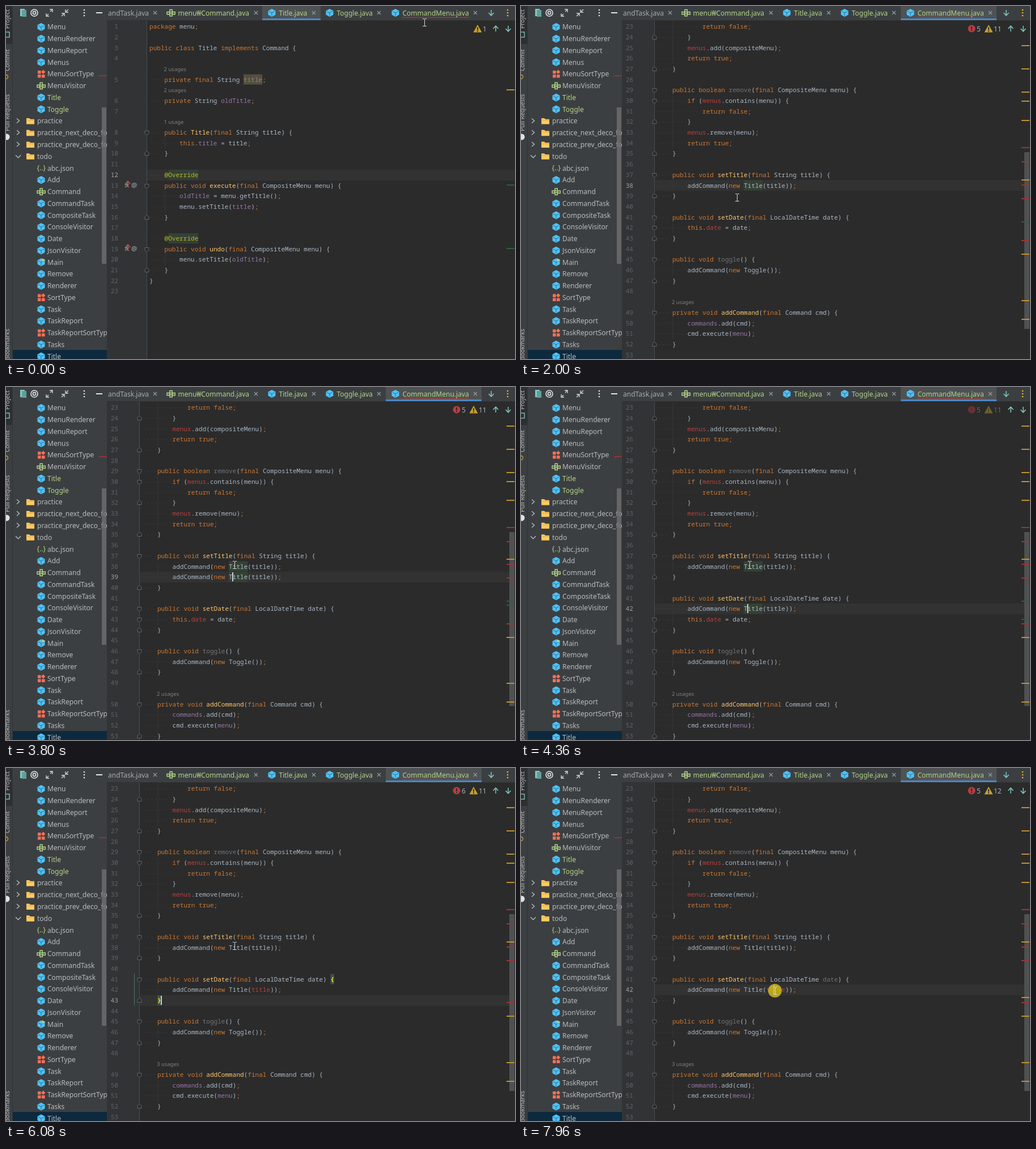
Write an HTML page with a canvas that moves like this. It is 898 by 623 pixels and loops after 8 s.

```html
<!DOCTYPE html>
<html lang="en">
<head>
<meta charset="utf-8">
<title>Code editor</title>
<style>
html, body { margin: 0; width: 100%; height: 100%; overflow: hidden; background: #2b2b2b; }
canvas { display: block; }
</style>
</head>
<body>
<canvas id="stage" width="898" height="623"></canvas>
<script>
const ctx = document.getElementById('stage').getContext('2d');
const LOOP = 8000, CH = 6.64, ROW = 18.69, TOP = 36.2;
const MONO = '11.07px "Noto Sans Mono", "DejaVu Sans Mono", monospace';
const sans = size => `${size}px "Noto Sans", "Open Sans", sans-serif`;
const KEYWORD = /^(package|public|private|final|class|implements|void|boolean|return|true|false|new|this|if)$|^[;,]$/;
const GREEN = '#b3d588', CYAN = '#4fc3f7', TEAL = '#80cbc4', PANEL = '#3c3f41';
const STYLE = { k: '#cc7832', t: '#a9b7c6', m: '#ffc66d', f: '#9876aa', r: '#bc3f3c', g: '#72737a',
  a: '#bbb529', h: '#a9b7c6', o: '#bbb529', w: '#94799f', b: '#ffef28' };
const BACK = { h: '#344134', o: '#344134', w: '#52503a', b: '#3b514d' };

const titleDoc = `package menu;

public class Title implements Command {

#2 usages
    private final String [w:title];
#2 usages
    private String [f:oldTitle];

#1 usage
    public [m:Title](final String title) {
        this.[f:title] = title;
    }

    [a:@][o:Override]
    public void [m:execute](final CompositeMenu menu) {
        [f:oldTitle] = menu.getTitle();
        menu.setTitle([f:title]);
    }

    [a:@][o:Override]
    public void [m:undo](final CompositeMenu menu) {
        menu.setTitle([f:oldTitle]);
    }
}
`.split('\n');

const menuDoc = `            return false;
        }
        [r:menus].add(compositeMenu);
        return true;
    }

    public boolean [g:remove](final CompositeMenu menu) {
        if ([r:menus].contains(menu)) {
            return false;
        }
        [r:menus].remove(menu);
        return true;
    }

    public void [m:setTitle](final String title) {
        addCommand(new [h:Title](title));
    }

    public void [m:setDate](final LocalDateTime date) {
        this.[r:date] = date;
    }

    public void [g:toggle]() {
        addCommand(new Toggle());
    }

#2 usages
    private void [m:addCommand](final Command cmd) {
        [f:commands].add(cmd);
        cmd.execute([f:menu]);
    }
`.split('\n');

// time, line, column, shown
const carets = [[320, 38, 27, 1], [800, 38, 27, 0], [1320, 38, 27, 1], [1840, 38, 27, 0],
  [2160, 39, 5, 1], [2640, 39, 5, 0], [2880, 38, 24, 1], [3400, 38, 24, 0],
  [3800, 39, 24, 1], [4080, 40, 20, 1], [4200, 41, 20, 1], [4360, 42, 24, 1],
  [4760, 43, 24, 1], [5440, 43, 24, 0], [6080, 43, 5, 1], [6600, 43, 5, 0],
  [7120, 43, 5, 1], [7280, 42, 31, 1]];
// time, x, y
const path = [[0, 738, 29], [80, 738, 29], [240, 738, 18], [480, 738, 18], [880, 650, 120],
  [1720, 306, 352], [1880, 306, 352], [2000, 381, 338], [2160, 381, 338], [2640, 388, 402],
  [2720, 388, 402], [2880, 403, 314], [6600, 403, 314], [7280, 448, 393], [8000, 448, 393]];
const clicks = [[240, 480], [2160, 2320], [2840, 3000], [7280, 7440], [7840, 8000]];

const tree = `c Menu,c MenuRenderer,c MenuReport,c Menus,e MenuSortType,i MenuVisitor,c Title,c Toggle,
d practice,d practice_next_deco_fo,d practice_prev_deco_fo,o todo,j abc.json,c Add,i Command,c CommandTask,
c CompositeTask,c ConsoleVisitor,c Date,c JsonVisitor,m Main,c Remove,c Renderer,e SortType,c Task,
c TaskReport,e TaskReportSortType,c Tasks,c Title`.replace(/\n/g, '').split(',');

function rect(x, y, w, h, color) { ctx.fillStyle = color; ctx.fillRect(x, y, w, h); }
function text(s, x, y, color, font) { ctx.font = font; ctx.fillStyle = color; ctx.fillText(s, x, y); }
function disc(x, y, r, color) {
  ctx.fillStyle = color; ctx.beginPath(); ctx.arc(x, y, r, 0, 7); ctx.fill();
}
function trace(points, close) {
  ctx.beginPath();
  points.forEach(([x, y]) => ctx.lineTo(x, y));
  if (close) ctx.closePath();
}
function line(points, color, width = 1) {
  trace(points); ctx.strokeStyle = color; ctx.lineWidth = width; ctx.stroke();
}
function poly(points, color) { trace(points, true); ctx.fillStyle = color; ctx.fill(); }
function at(x, y, draw) { ctx.save(); ctx.translate(x, y); draw(); ctx.restore(); }

const icons = {
  c() {
    poly([[0, -7], [6.5, -3.5], [6.5, 3.5], [0, 7], [-6.5, 3.5], [-6.5, -3.5]], CYAN);
    line([[-5, -2.5], [0, 0.2], [5, -2.5]], '#32698a');
    line([[0, 0], [0, 5.5]], '#32698a');
  },
  m() { icons.c(); poly([[2, -7], [7.5, -4], [2, -1]], GREEN); },
  e() {
    [[-6, -6], [-6, 1], [1, 1]].forEach(([x, y]) => rect(x, y, 5.5, 5.5, '#ff7058'));
    poly([[3.7, -7.5], [7.3, -3.6], [3.7, 0], [0, -3.6]], '#ff7058');
  },
  i() {
    ctx.strokeStyle = GREEN; ctx.lineWidth = 1.5;
    [[-7, -1.5], [-2, -5.5], [-2, 1.5], [3, -1.5]].forEach(([x, y]) => ctx.strokeRect(x, y, 4.2, 4.2));
  },
  j() { text('{..}', -7.5, 4, GREEN, sans(12)); },
  d() {
    poly([[-7, -5], [-2, -5], [0, -3.3], [7, -3.3], [7, 5.5], [-7, 5.5]], '#ffca62');
    line([[-5, -1.5], [7, -1.5]], '#d8a545');
  },
  o() { icons.d(); }
};

function arrow(x, y, up, color) {
  const s = up ? -1 : 1;
  line([[x, y - 5 * s], [x, y + 4.5 * s]], color, 1.5);
  line([[x - 4.5, y], [x, y + 4.8 * s], [x + 4.5, y]], color, 1.5);
}
function dots(x, color) { [7, 12, 17].forEach(y => disc(x, y, 1.3, color)); }

function sidebar() {
  rect(0, 0, 178, 623, PANEL);
  ctx.save();
  ctx.beginPath(); ctx.rect(12, 25, 166, 598); ctx.clip();
  rect(12, 607, 166, 16, '#0d293e');
  tree.forEach((entry, i) => {
    const type = entry[0], name = entry.slice(2), y = 37 + i * 20.76;
    const folder = type === 'd' || type === 'o';
    at(folder ? 43 : 62, y, icons[type]);
    if (type === 'd') line([[19, y - 4.5], [23.5, y - 0.5], [19, y + 3.5]], '#b5b9bc', 1.4);
    if (type === 'o') line([[17, y - 2], [21.5, y + 2.5], [26, y - 2]], '#b5b9bc', 1.4);
    text(name, folder ? 55 : 73, y + 4.4, i === 6 || i === 7 ? GREEN : '#b9bdbf', sans(12));
  });
  rect(164, 122, 14, 2, '#8f3535');
  rect(169, 179, 8, 276, 'rgba(112,114,116,.75)');
  ctx.restore();

  rect(25, 5, 8, 13, TEAL);
  rect(28, 7, 8, 12, '#5f9f9c');
  ctx.strokeStyle = '#e4e6e7'; ctx.lineWidth = 1.6;
  ctx.beginPath(); ctx.arc(50, 12, 6, 0, 7); ctx.stroke();
  ctx.beginPath(); ctx.arc(50, 12, 2.6, 0, 7); ctx.stroke();
  line([[77, 6], [82, 6], [82, 11]], '#d5d7d8', 1.3);
  line([[71, 13], [71, 18], [76, 18]], '#d5d7d8', 1.3);
  line([[78, 10], [82, 6]], '#d5d7d8', 1.3);
  line([[71, 18], [75, 14]], '#d5d7d8', 1.3);
  line([[105, 6], [105, 11], [110, 11]], '#d5d7d8', 1.3);
  line([[98, 13], [103, 13], [103, 18]], '#d5d7d8', 1.3);
  line([[105, 11], [110, 6]], '#d5d7d8', 1.3);
  line([[103, 13], [98, 18]], '#d5d7d8', 1.3);
  dots(138, '#e4e6e7');
  rect(159, 11, 11, 2, '#e4e6e7');

  rect(0, 0, 11, 67, '#2d2f30');
  rect(11, 0, 1, 623, '#323436');
  [['Project', 40], ['Commit', 115], ['Pull Requests', 221], ['Bookmarks', 625]].forEach(([s, y]) =>
    at(5.5, y, () => { ctx.rotate(-Math.PI / 2); text(s, 0, 0, '#bbbdbf', sans(10.4)); }));
  ctx.strokeStyle = TEAL; ctx.lineWidth = 1.3; ctx.strokeRect(-3, 46, 9, 9);
  ctx.strokeStyle = '#d9a03a'; ctx.beginPath(); ctx.arc(0, 125, 3.5, 0, 7); ctx.stroke();
  disc(1, 231, 5.5, '#e0e2e3');
}

function tabs(titleOpen) {
  rect(178, 0, 720, 25, PANEL);
  const [x, w] = titleOpen ? [452, 103] : [670, 169];
  rect(x, 0, w, 25, '#4e5254');
  rect(x, 22, w, 3, '#4a88c7');
  rect(178, 25, 720, 1, '#323232');
  ctx.save();
  ctx.beginPath(); ctx.rect(179, 0, 719, 25); ctx.clip();
  ctx.textAlign = 'right';
  text('CommandTask.java', 252, 17, '#a7abae', sans(12));
  ctx.textAlign = 'left';
  [['i', 291, 'menu₩Command.java'], ['c', 469, 'Title.java'], ['c', 571, 'Toggle.java'],
    ['c', 687, 'CommandMenu.java']].forEach(([icon, ix, s]) => {
    at(ix, 12, icons[icon]);
    text(s, ix + 12.5, 17, GREEN, sans(12));
  });
  ctx.restore();
  const wave = Array.from({ length: 60 }, (_, i) => [699 + i * 2, i % 2 ? 19.3 : 20.8]);
  line(wave, '#bc3f3c');
  [263, 441, 543, 658, 828].forEach(cx => {
    line([[cx - 3, 9], [cx + 3, 15]], '#9a9ea1', 1.1);
    line([[cx - 3, 15], [cx + 3, 9]], '#9a9ea1', 1.1);
  });
  arrow(856, 12, false, TEAL);
  dots(885, '#f0b73a');
}

function codeLine(src, x0, y) {
  let col = 0;
  const put = (s, style) => {
    const x = x0 + col * CH;
    if (BACK[style]) rect(x, y - 9, s.length * CH, 18, BACK[style]);
    text(s, x, y + 4, STYLE[style], (style === 'b' ? 'bold ' : '') + MONO);
    col += s.length;
  };
  const indent = src.search(/\S/);
  for (let i = 0; i < indent; i++) rect(x0 + (i + 0.5) * CH, y, 1, 1, '#4b4b4b');
  if (indent >= 8) rect(Math.round(x0 + 4 * CH), y - 9, 1, 19, '#363636');
  src.split(/(\[\w:[^\]]*\])/).forEach(part => {
    const mark = part.match(/^\[(\w):(.*)\]$/);
    if (mark) return put(mark[2], mark[1]);
    (part.match(/\s+|\w+|[;,]|[^\s\w;,]+/g) || []).forEach(tok => put(tok, KEYWORD.test(tok) ? 'k' : 't'));
  });
}

function fold(x, y, down) {
  const s = down ? 1 : -1;
  trace([[x - 3.5, y - 3 * s], [x + 3.5, y - 3 * s], [x + 3.5, y + 1.5 * s], [x, y + 4.5 * s], [x - 3.5, y + 1.5 * s]], true);
  ctx.fillStyle = '#2b2b2b'; ctx.fill();
  ctx.strokeStyle = '#626567'; ctx.lineWidth = 1; ctx.stroke();
}

function editor(doc, first, gutter, x0, current, bare) {
  rect(178, 26, 720, 597, '#2b2b2b');
  rect(178, 26, gutter - 178, 597, '#313335');
  rect(gutter, 26, 1, 597, '#4a4d4f');
  let n = first;
  doc.forEach((src, i) => {
    const y = TOP + i * ROW;
    if (src[0] === '#') return text(src.slice(1), x0 + 4 * CH - 1, y + 4, '#808080', sans(9.5));
    const active = n === current;
    if (active) rect(gutter + 1, Math.round(y - 9.3), 897 - gutter, 19, '#323232');
    ctx.textAlign = 'right';
    text(n, 198, y + 4, active ? '#a4a3a3' : '#606366', MONO);
    ctx.textAlign = 'left';
    codeLine(src, x0, y);
    const opens = /^ +.*\{\]?$|this\.\[r:date/.test(src);
    if (n !== bare && (opens || /^ +(\[b:)?\}/.test(src))) fold(gutter + 0.5, Math.round(y) + 0.5, opens);
    n++;
  });
}

function stripe(color, list) { list.forEach(y => rect(883, Math.round(y) - 1, 14, 2, color)); }

function widget(errors, warnings, dim) {
  ctx.globalAlpha = dim ? 0.45 : 1;
  const wx = warnings > 9 ? 825 : 832;
  if (errors) {
    disc(795, 40, 6.5, '#b93c42');
    rect(794, 36, 2, 5, '#2b2b2b'); rect(794, 42, 2, 2, '#2b2b2b');
    text(errors, 804, 45, '#a9b0b5', sans(12));
  }
  poly([[wx, 33], [wx + 7.5, 46.5], [wx - 7.5, 46.5]], '#c8a02c');
  rect(wx - 1, 37.5, 2, 4.5, '#2b2b2b'); rect(wx - 1, 43, 2, 2, '#2b2b2b');
  text(warnings, wx + 9, 45, '#a9b0b5', sans(12));
  ctx.globalAlpha = 1;
  arrow(864, 40, true, TEAL);
  arrow(886, 40, false, TEAL);
}

function titleView() {
  editor(titleDoc, 1, 248, 253, 12);
  [315.9, 428].forEach(y => {
    text('f', 207, y + 4, '#7fae68', 'italic ' + MONO);
    text('x', 211, y + 4, '#a9b7c6', MONO);
    arrow(215, y - 2, true, '#c9514a');
    text('@', 221, y + 4, '#b5babd', sans(11.5));
  });
  stripe('#c0932b', [148]);
  stripe('#24663a', [316, 428]);
  widget(0, 1);
}

function menuLines(t) {
  const doc = menuDoc.slice();
  const brace = i => { doc[i] = doc[i].replace(/([{}])$/, '[b:$1]'); };
  if (t >= 5440) doc[26] = '#3 usages';
  if (t >= 2160 && t < 2880) {
    brace(14); brace(16);
    doc[15] = doc[15].replace('[h:Title]', 'Title');
  }
  if (t < 3800) return doc;
  const slot = t < 4080 ? 16 : t < 4200 ? 17 : t < 4360 ? 18 : 19;
  let copy = doc[15];
  if (slot === 17 || slot === 18) copy = copy.slice(4);
  if (t >= 4760) {
    doc[15] = doc[15].replace('[h:Title]', 'Title');
    copy = doc[15].replace('(title)', '([r:title])');
  }
  doc.splice(slot, 0, copy);
  if (t >= 6080) {
    doc.splice(20, 1);
    if (t < 7280) { brace(18); brace(20); }
    else doc[18] = doc[18].replace('date)', '[g:date])');
  }
  return doc;
}

function menuView(t) {
  const [, row, col, shown] = carets.filter(c => c[0] <= t).pop();
  const x0 = 240.4;
  editor(menuLines(t), 23, 235, x0, row, t >= 4360 && t < 4760 ? 41 : 0);
  if (t >= 6080 && t < 7280) rect(226, 363, 1, 56, '#4d7a66');
  if (shown) rect(Math.round(x0 + col * CH) - 1, Math.round(TOP + (row - 23) * ROW) - 8, 2, 16, '#d0d0d0');

  const longer = t >= 3800 && t < 6080;
  const place = y => longer ? y * 0.9915 + (y > 400 ? 7.5 : 0) : y;
  rect(888, longer ? 256 : 258, 9, longer ? 307 : 312, '#505152');
  stripe('#c0932b', [70, 111, 152, 168, 202, 307, 438, 520, 553].map(place));
  stripe('#9c3535', [250, 275, 316, 340, 414].map(place));
  if (t < 4760) stripe('#24663a', t < 3800 ? [381] : t < 4080 ? [378, 385] : [378, 410]);
  if (t >= 7280) stripe('#c0932b', [405]);
  widget(t >= 4760 && t < 6400 ? 6 : 5, t >= 7280 ? 12 : 11, t >= 3880 && t < 4760);
}

function pointer(t) {
  const i = Math.max(1, path.findIndex(p => p[0] > t));
  const [ta, xa, ya] = path[i - 1], [tb, xb, yb] = path[i];
  const k = (t - ta) / (tb - ta), e = k * k * (3 - 2 * k);
  const x = Math.round(xa + (xb - xa) * e), y = Math.round(ya + (yb - ya) * e);
  if (clicks.some(([a, b]) => t >= a && t < b)) disc(x, y - (y < 26 ? 1 : 0), 12, 'rgba(206,188,26,.85)');
  at(x, y, () => {
    if (y < 26) {
      trace([[0, 0], [0, 13], [3, 10.3], [5, 15], [7.2, 14], [5.2, 9.5], [9, 9.2]], true);
      ctx.fillStyle = '#fff'; ctx.fill();
      ctx.strokeStyle = '#111'; ctx.lineWidth = 0.8; ctx.stroke();
    } else {
      rect(0, -6, 1, 13, '#d6d6d6');
      [-7, 6].forEach(dy => { rect(-3, dy, 3, 1, '#d6d6d6'); rect(1, dy, 3, 1, '#d6d6d6'); });
    }
  });
}

function draw(t) {
  const titleOpen = t < 320;
  titleOpen ? titleView() : menuView(t);
  tabs(titleOpen);
  sidebar();
  pointer(t);
}

const start = performance.now();
let last = -1;
function tick() {
  const t = Math.floor((performance.now() - start) % LOOP / 40) * 40;
  if (t !== last) draw(last = t);
  requestAnimationFrame(tick);
}
tick();
</script>
</body>
</html>
```
